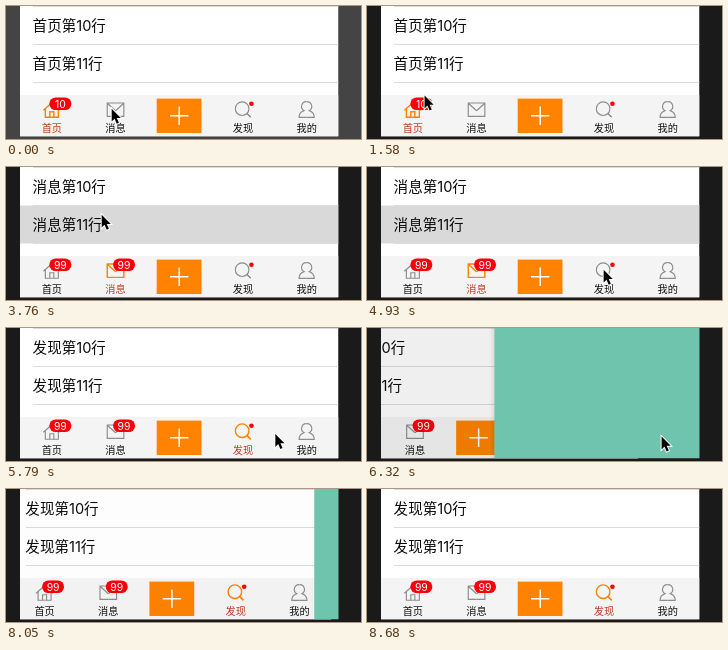
Animation, 355 px wide and 133 px high, one loop 9.82 s. Source, as an HTML page with a canvas:

```html
<!DOCTYPE html>
<html lang="zh">
<head>
<meta charset="utf-8">
<style>
  html, body { margin: 0; width: 100%; height: 100%; overflow: hidden; background: #1a1a1a; }
  canvas { display: block; width: 355px; height: 133px; }
</style>
</head>
<body>
<canvas id="stage"></canvas>
<script>
const W = 355, H = 133, LOOP = 9820;
const LEFT = 14, RIGHT = 332.5, SCREEN_W = RIGHT - LEFT, BOTTOM = 130.5;
const ROW_H = 38, BAR_TOP = 89;
const FONT = 'Inter, "Noto Sans CJK SC", "Noto Sans CJK", sans-serif';
const ORANGE = '#ff8200', RED = '#fa0008', GREY = '#8c8c8c';
const PUSH = 6197, POP = 7812;

// Right halves of the icons; each is mirrored on its axis
const TABS = [
  { title: '首页', half: 'M0 -7 L8.5 .5 M6.5 -1 V7.5 H0 M2 7.5 V2 H0' },
  { title: '消息', half: 'M0 -6.7 H8.3 V6.7 H0 M8 -6.2 L0 1' },
  { title: '发现', half: 'M0 -6.8 A6.8 6.8 0 0 1 0 6.8 V12', tilt: -Math.PI / 4 },
  { title: '我的', half: 'M0 -8 A4.8 4.8 0 0 1 2.6 1 Q7.6 2.5 7.6 7.7 H0' }
];

// Where the pointer rests, when it acts there, and what it selects
const STOPS = [
  { time: 0, x: 105, y: 102, tab: 0 },
  { time: 660, x: 105, y: 102, tab: 1 },
  { time: 1360, x: 45, y: 105, tab: 0 },
  { time: 2050, x: 81, y: 56, row: true },
  { time: 3170, x: 105, y: 103, tab: 1 },
  { time: 3760, x: 95, y: 47, row: true },
  { time: 5170, x: 236, y: 102, tab: 2 },
  { time: 6200, x: 294, y: 108 },
  { time: 6930, x: 170, y: -25 },
  { time: 8920, x: 328, y: 140 }
];
const MOVE_TIME = 380, REST_BEFORE_TAP = 235;

const canvas = document.getElementById('stage');
const ctx = canvas.getContext('2d');
const ratio = window.devicePixelRatio || 1;
canvas.width = W * ratio;
canvas.height = H * ratio;

const clamp = v => Math.max(0, Math.min(1, v));
const smooth = v => v * v * (3 - 2 * v);
const mix = (a, b, k) => a + (b - a) * k;

// The middle fifth of the bar holds the plus button
const tabCenter = i => LEFT + SCREEN_W / 5 * (i + (i > 1 ? 1.5 : 0.5));

// Critically damped spring from 0 to 1
function spring(ms) {
  if (ms <= 0) return 0;
  if (ms > 540) return 1;
  const x = ms * 0.0177;
  return 1 - (1 + x) * Math.exp(-x);
}

// Replays the taps up to t
function stateAt(t) {
  const state = { tab: 0, tapTime: -LOOP, row: false, badges: ['10'] };
  for (const stop of STOPS.filter(s => s.time <= t)) {
    if (stop.row) {
      state.row = true;
      state.badges[state.tab] = '99';
    } else if (stop.tab !== undefined && stop.tab !== state.tab) {
      Object.assign(state, { tab: stop.tab, tapTime: stop.time, row: false });
    }
  }
  return state;
}

function rect(x, y, w, h, color) {
  ctx.fillStyle = color;
  ctx.fillRect(x, y, w, h);
}

function pill(x, y, w, h) {
  ctx.fillStyle = RED;
  ctx.beginPath();
  ctx.roundRect(x - w / 2, y - h / 2, w, h, h / 2);
  ctx.fill();
}

function text(value, x, y, size, color, align = 'left') {
  ctx.font = `${size}px ${FONT}`;
  ctx.textAlign = align;
  ctx.fillStyle = color;
  ctx.fillText(value, x, y);
}

function stroke(path, color, width) {
  ctx.strokeStyle = color;
  ctx.lineWidth = width;
  ctx.stroke(new Path2D(path));
}

function drawTab({ title, half, tilt = 0 }, x, selected, scale) {
  ctx.save();
  ctx.translate(x, 110);
  ctx.scale(scale, scale);
  text(title, 0, 15.8, 10.2, selected ? '#c03a22' : '#111', 'center');
  ctx.translate(tilt && -0.8, tilt ? -7.3 : -6.3);
  ctx.rotate(tilt);
  for (const side of [1, -1]) {
    ctx.scale(side, 1);
    stroke(half, selected ? ORANGE : GREY, selected ? 1.4 : 1.15);
  }
  ctx.restore();
}

function drawPage(t) {
  const { tab, tapTime, row, badges } = stateAt(t);

  rect(LEFT, 0, SCREEN_W, BOTTOM, '#fff');
  if (row) rect(LEFT, ROW_H + 0.5, SCREEN_W, ROW_H, '#d9d9d9');
  for (let i = 0; i < 3; i++) rect(27, i * ROW_H, RIGHT - 27, 1, '#dcdcde');
  for (let i = 0; i < 2; i++) {
    text(`${TABS[tab].title}第1${i}行`, 26.6, 24.7 + i * ROW_H, 14.55, '#0c0c0c');
  }

  rect(LEFT, BAR_TOP, SCREEN_W, BOTTOM - BAR_TOP, '#f4f4f4');
  rect(150.7, 92.6, 44.8, 34.4, ORANGE);
  stroke('M164 109.7 h18.4 m-9.2 -9.2 v18.4', '#fff', 1.5);

  const bounce = mix(0.6, 1, smooth(clamp((t - tapTime) / 210)));
  TABS.forEach((item, i) => drawTab(item, tabCenter(i), i === tab, i === tab ? bounce : 1));
  badges.forEach((value, i) => {
    const x = tabCenter(i) + 8.5;
    pill(x, 97.8, 22, 12.6);
    text(value, x, 101.6, 10.4, '#fff', 'center');
  });
  pill(tabCenter(2) + 8.5, 97.7, 4.6, 4.6);
}

function drawPointer(t) {
  let { x, y } = STOPS[0];
  for (const stop of STOPS) {
    const start = stop.time - REST_BEFORE_TAP - MOVE_TIME;
    const k = smooth(clamp((t - start) / MOVE_TIME));
    x = mix(x, stop.x, k);
    y = mix(y, stop.y, k);
  }
  ctx.save();
  ctx.translate(x, y);
  ctx.scale(0.87, 0.87);
  const arrow = 'M.8 .8 V15.6 L4.1 12.3 L6.6 18 L9.1 16.9 L6.6 11.4 H11.3 Z';
  stroke(arrow, '#fff', 2.2);
  ctx.fillStyle = '#000';
  ctx.fill(new Path2D(arrow));
  ctx.restore();
}

function drawCover(amount) {
  const x = RIGHT - SCREEN_W * amount;
  const shadow = ctx.createLinearGradient(x - 5, 0, x, 0);
  shadow.addColorStop(0, 'rgba(0,0,0,0)');
  shadow.addColorStop(1, `rgba(0,0,0,${0.12 * amount})`);
  rect(LEFT, 0, SCREEN_W, BOTTOM, `rgba(0,0,0,${0.1 * amount})`);
  rect(x - 5, 0, 5, BOTTOM, shadow);
  rect(x, 0, SCREEN_W, BOTTOM, '#6fc4ad');
}

function draw(t) {
  ctx.setTransform(ratio, 0, 0, ratio, 0, 0);
  rect(0, 0, W, H, t < STOPS[1].time ? '#444445' : '#1a1a1a');

  const cover = spring(t - PUSH) - spring(t - POP);
  ctx.save();
  ctx.beginPath();
  ctx.rect(LEFT, 0, SCREEN_W, BOTTOM);
  ctx.clip();
  ctx.save();
  ctx.translate(-0.3 * SCREEN_W * cover, 0);
  drawPage(t);
  ctx.restore();
  if (cover > 0) drawCover(cover);
  ctx.restore();
  drawPointer(t);
}

function frame() {
  draw(performance.now() % LOOP);
  requestAnimationFrame(frame);
}
frame();
</script>
</body>
</html>
```
